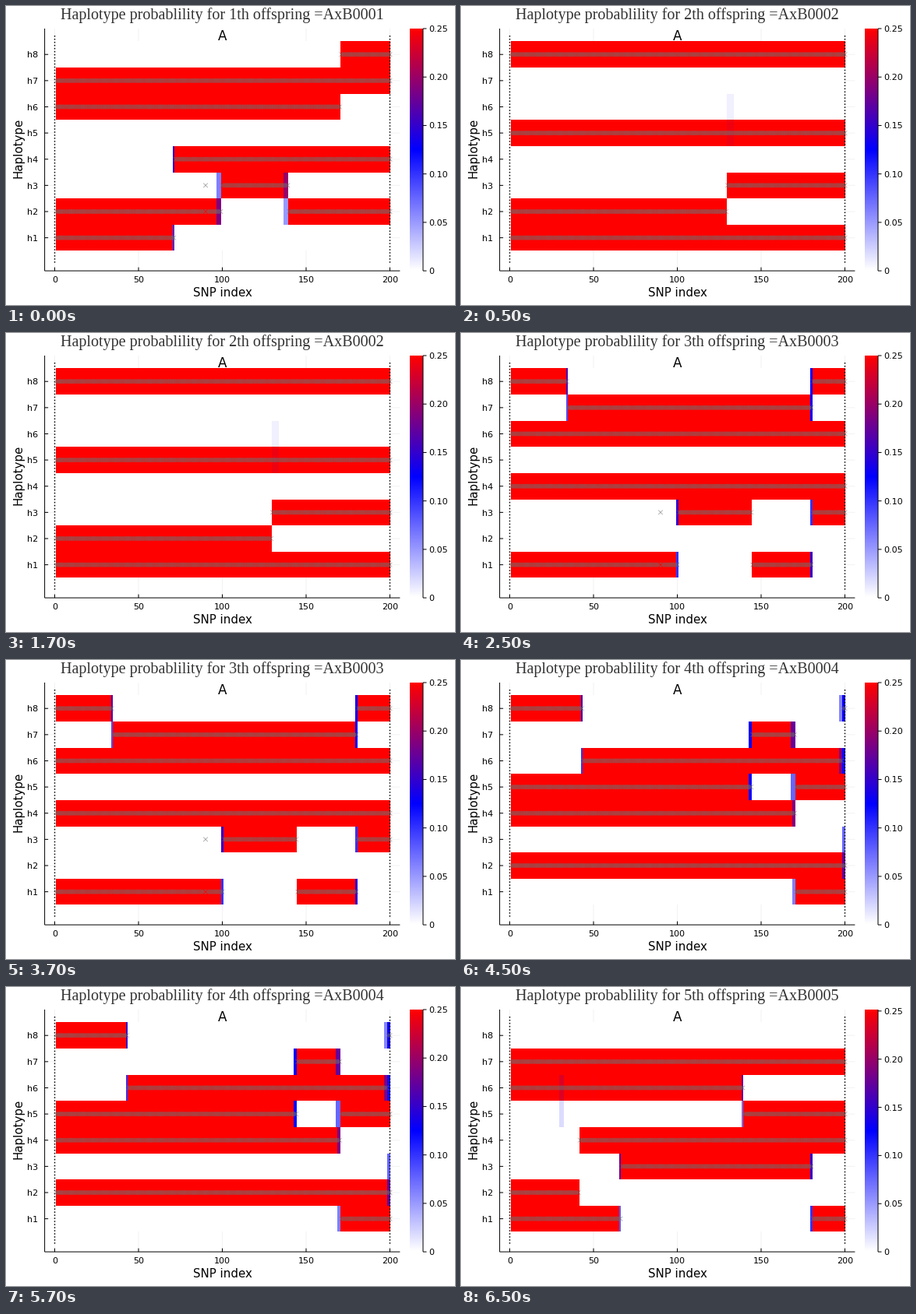
Animation, 576 px wide and 384 px high, one loop 8000 ms. Source, as a matplotlib script:

```python
import numpy as np
import matplotlib.pyplot as plt
from matplotlib.animation import FuncAnimation
from matplotlib.collections import LineCollection
from matplotlib.colors import LinearSegmentedColormap

W, H, DPI = 576, 384, 100
PX = 72 / DPI  # one pixel in points
LEFT, RIGHT, TOP, BOTTOM = 49.6, 505.4, 29, 340.1
ROW = 33.63
SNPS, ROWS, FULL = 200, 8, 0.25

# Each offspring has four chromosome strands. A strand starts on a haplotype
# and follows switches (haplotype, first SNP, blurred SNPs, share while blurred).
OFFSPRING = [
    [[6, (8, 171)], [7], [1, (4, 71, 1, .6)],
     [2, (3, 97, 3, .25), (2, 137, 3, .2)]],
    [[8], [5, (6, 130, 4, .03), (5, 134)], [2, (3, 130)], [1]],
    [[8, (7, 34, 1, .35), (8, 180, 1, .5)], [6], [4],
     [1, (3, 100, 1, .6), (1, 145), (3, 180, 1, .4)]],
    [[8, (6, 43, 1, .4), (8, 197, 2, .24), (6, 199, 2, .48)],
     [5, (7, 143, 2, .52), (5, 168, 3, .3)],
     [4, (1, 169, 2, .25)], [2, (3, 199, 2, .3)]],
    [[7], [6, (5, 30, 3, .07), (6, 33), (7, 50, 1, .006), (6, 51), (5, 139, 1, .28)],
     [2, (4, 42)], [1, (3, 66, 1, .68), (1, 180, 1, .4)]],
]


def snp_x(snp):
    return 62.5 + 2.15 * snp


def row_y(row):
    return 297.63 - ROW * (row - 1)


def follow(start, *switches):
    """Share of each haplotype along a strand, and the haplotype it marks."""
    share = np.zeros((ROWS, SNPS))
    share[start - 1] = 1
    marked = np.full(SNPS, start)
    for row, first, *blur in switches:
        width, part = blur or (0, 0)
        end = first - 1 + width
        share[:, first - 1:end] *= 1 - part
        share[row - 1, first - 1:end] += part
        share[:, end:] = 0
        share[row - 1, end:] = 1
        marked[end:] = row
    marked[89] = marked[100]  # one misplaced marker reads ahead
    return share, marked


def crosses(marked, arm=2.8):
    for snp, row in enumerate(marked, 1):
        x, y = snp_x(snp), row_y(row)
        for rise in (-arm, arm):
            yield [(x - arm, y - rise), (x + arm, y + rise)]


fig = plt.figure(figsize=(W / DPI, H / DPI), dpi=DPI, facecolor="white")
ax = fig.add_axes([0, 0, 1, 1])
ax.axis("off")


def line(x0, y0, x1, y1, color="black", width=1.0, zorder=5, **style):
    return ax.plot([x0, x1], [y0, y1], color=color, lw=width * PX, zorder=zorder,
                   solid_capstyle="butt", snap=False, **style)[0]


def label(x, y, text, px=11.1, font="DejaVu Sans", **style):
    return ax.text(x, y, text, fontsize=px * PX, family=font, **style)


cmap = LinearSegmentedColormap.from_list("prob", ["white", "blue", "red"], N=512)

# Grid, axes and tick labels
for snp in range(0, SNPS + 1, 50):
    x = snp_x(snp)
    line(x, TOP, x, BOTTOM, "#f3f3f3", zorder=0)
    line(x, BOTTOM, x, BOTTOM - 4.5)
    label(x, 355, str(snp), ha="center")
for row in range(1, ROWS + 1):
    y = row_y(row)
    line(LEFT, y, RIGHT, y, "#f3f3f3", zorder=0)
    line(LEFT, y, LEFT + 4.5, y)
    label(41.2, y + 4.2, f"h{row}", ha="right")
line(LEFT, TOP, LEFT, BOTTOM)
line(LEFT, BOTTOM, RIGHT, BOTTOM)
label(277.5, 373, "SNP index", 15, ha="center")
label(16.5, 182.5, "Haplotype", 15, rotation=90, ha="center", va="center")
label(277.5, 44.2, "A", 16.7, ha="center", zorder=6)
title = label(277.2, 16.8, "", 20.1, "Liberation Serif", color="#333333", ha="center")

# Heatmap, markers and chromosome borders
x_edges = snp_x(np.clip(np.arange(SNPS + 1) + 0.5, 0, SNPS))
y_edges = row_y(np.arange(ROWS + 1) + 0.5)
mesh = ax.pcolormesh(x_edges, y_edges, np.zeros((ROWS, SNPS)), cmap=cmap,
                     vmin=0, vmax=FULL, zorder=1)
for snp in (0, SNPS):
    line(snp_x(snp), 38, snp_x(snp), 331, width=1.5, zorder=3,
         linestyle=(0, (1, 1.65)), dash_capstyle="butt")
markers = LineCollection([], colors="#707070", alpha=0.65,
                         linewidths=0.8 * PX, zorder=4)
ax.add_collection(markers, autolim=False)

# Colour bar
ax.pcolormesh([518, 535], np.linspace(BOTTOM, TOP, 312),
              np.linspace(0, 1, 311)[:, None], cmap=cmap, vmin=0, vmax=1)
line(535, TOP, 535, BOTTOM)
bar_values = np.arange(6) * 0.05
bar_ticks = [(line(535, 0, 539.5, 0), label(542.2, 0, f"{v:.2f}" if v else "0"))
             for v in bar_values]

ax.set_xlim(0, W)
ax.set_ylim(H, 0)


def update(frame):
    index = (frame + 3) // 4  # a new offspring every two seconds
    number = index + 1
    strands = [follow(*strand) for strand in OFFSPRING[index]]
    prob = FULL * sum(share for share, _ in strands)
    title.set_text(f"Haplotype probablility for {number}th offspring =AxB{number:04d}")
    mesh.set_array(prob)
    markers.set_segments([s for _, marked in strands for s in crosses(marked)])
    scale = (BOTTOM - TOP) / prob.max()
    for value, (tick, text) in zip(bar_values, bar_ticks):
        y = BOTTOM - value * scale
        tick.set_ydata([y, y])
        text.set_y(y + 4)
    return title, mesh, markers


anim = FuncAnimation(fig, update, frames=16, interval=500, repeat=True,
                     repeat_delay=0, blit=False)
plt.show()
```
